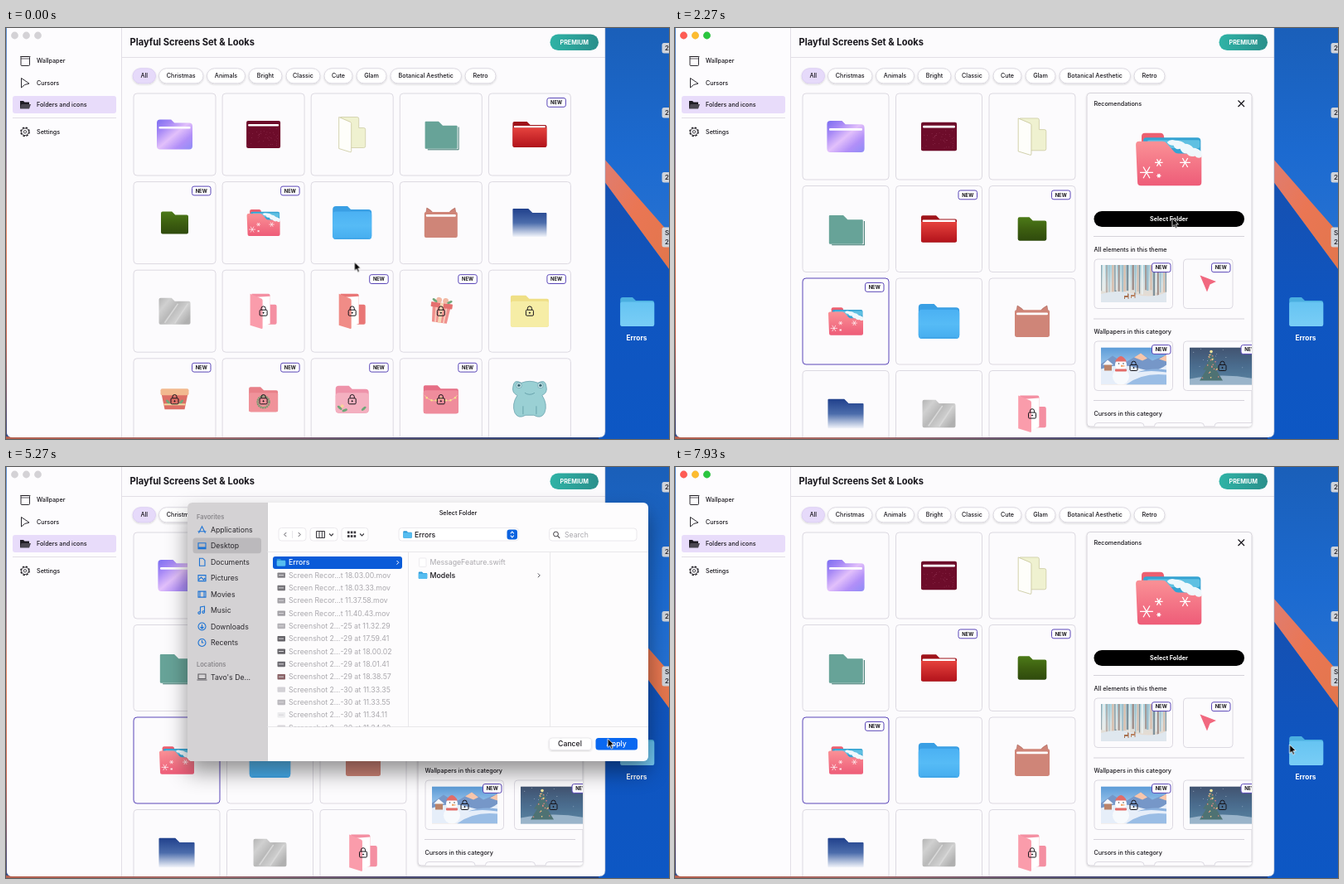
Animation, 800 px wide and 496 px high, one loop 8000 ms. Source, as an HTML page:

```html
<!DOCTYPE html>
<html lang="en">
<head>
<meta charset="utf-8">
<title>Folder themes</title>
<style>
html,body{margin:0;width:100%;height:100%;overflow:hidden;background:#1059c4}
svg{display:block;width:100vw;height:100vh}
text{font-family:Inter,"Open Sans",sans-serif;font-weight:500;fill:#17151b;white-space:pre}
#dialog{transform-origin:497px 199px}
</style>
</head>
<body>
<svg id="stage" viewBox="0 0 800 496" xmlns="http://www.w3.org/2000/svg"></svg>
<script>
const LOOP = 8000;
const BORDER = '#dcd9e1', INK = '#17151b', VIOLET = '#5a46b8';

let seed = 7;
const rnd = () => (seed = seed * 16807 % 2147483647) / 2147483647;
const times = (n, fn) => Array.from({length: n}, (_, i) => fn(i)).join('');

const rect = (x, y, w, h, fill, r = 0, more = '') =>
  `<rect x="${x}" y="${y}" width="${w}" height="${h}" rx="${r}" fill="${fill}" ${more}/>`;
const circle = (x, y, r, fill, more = '') => `<circle cx="${x}" cy="${y}" r="${r}" fill="${fill}" ${more}/>`;
const path = (d, fill, more = '') => `<path d="${d}" fill="${fill}" ${more}/>`;
const line = (d, color = INK, w = 1, more = '') => path(d, 'none', `stroke="${color}" stroke-width="${w}" ${more}`);
const text = (x, y, s, size = 7.2, more = '') => `<text x="${x}" y="${y}" font-size="${size}" ${more}>${s}</text>`;
const mid = (x, y, s, size, more = '') => text(x, y, s, size, 'text-anchor="middle" ' + more);
const group = (s, more = '') => `<g ${more}>${s}</g>`;
const at = (x, y, s, k = 1) => group(s, `transform="translate(${x} ${y}) scale(${k})"`);
const bold = 'style="font-weight:700"';
const white = 'style="font-weight:700;fill:#fff"';
const gray = 'style="font-weight:400;fill:#aaa8ad"';

const gradient = (id, stops, x2 = 0, y2 = 1) =>
  `<linearGradient id="${id}" x2="${x2}" y2="${y2}">` +
  stops.map((c, i) => `<stop offset="${i / (stops.length - 1)}" stop-color="${c}"/>`).join('') + '</linearGradient>';
const clip = (id, shape) => `<clipPath id="${id}">${shape}</clipPath>`;

const defs = `<defs>
${gradient('sky', ['#1a5fb9', '#1c6ad0', '#2a74d2'])}
${gradient('deepSky', ['#1650b0', '#0f55c0', '#0d57c4'])}
${gradient('band', ['#dc7f78', '#ea7654', '#e2764c'], 1, 1)}
${gradient('edge', ['#5f8fd0', '#8b93c4', '#e58a68', '#c96a55', '#384a80'])}
${gradient('floor', ['#b5614f', '#a46a6a', '#4a4a74', '#22407e'], 1, 0)}
${gradient('teal', ['#2fb3a6', '#2a8f8b'], 1, 0)}
${gradient('purple', ['#7b6df0', '#a88af6', '#e2c0fb', '#b18ff8', '#8f8cf6'], 1, 1)}
${gradient('red', ['#e5423d', '#b3131b'])}
${gradient('green', ['#4c7a18', '#3d5f10', '#2f4a0d'])}
${gradient('pink', ['#fa9196', '#ee5c78'])}
${gradient('azure', ['#4bb1f3', '#56bbf6', '#45adef'])}
${gradient('navy', ['#20408c', '#4b6cab', '#f3f5fb'])}
${gradient('silver', ['#b4b4b4', '#d0d0d0', '#b9b9b9', '#cfcfcf', '#b0b0b0'], 1, .7)}
${gradient('folderBlue', ['#66c4f2', '#79cdf6'])}
${gradient('forest', ['#a9d3df', '#d4e0e2', '#f0d9c8'])}
${gradient('dawn', ['#2f7fcc', '#7fb6e6', '#f6c9a6'])}
${gradient('night', ['#0c2348', '#17436e', '#2c6288'])}
${clip('window', path('M0 0H723V487q0 7-7 7H8q-7 0-7-7V0z', '#000'))}
${clip('panelBox', rect(497, 79, 199, 402, '#000', 4))}
${clip('list', rect(315, 103, 460, 210.5, '#000'))}
${clip('picture', rect(0, 0, 79, 45, '#000'))}
<filter id="soft" x="-10%" y="-10%" width="120%" height="125%"><feDropShadow dx="0" dy="1" stdDeviation="1" flood-opacity=".16"/></filter>
<filter id="deep" x="-15%" y="-15%" width="130%" height="145%"><feDropShadow dx="0" dy="13" stdDeviation="13" flood-opacity=".42"/></filter>
</defs>`;

// Folder icons, centred on 0,0
const folder = (w, h, fill, tab = .42, slope = 4, r = 2) => {
  const x = -w / 2, y = -h / 2;
  return path(`M${x} ${y + r}q0 ${-r} ${r} ${-r}h${w * tab - r}l${slope} ${slope}H${-x - r}q${r} 0 ${r} ${r}V${-y - r}q0 ${r} ${-r} ${r}H${x + r}q${-r} 0 ${-r} ${-r}z`, fill);
};
const strip = (w, y) => rect(-w / 2, y, w, 2.6, '#fff', 1);
const open = (back, front, stroke) =>
  path('M-14-21H6q2 0 2 2V-8h6q2 0 2 2V14q0 2-2 2H-14z', back, stroke ? `stroke="${stroke}" stroke-width=".7"` : '') +
  (stroke ? '' : path('M-8-17L8-18V15L-2 19z', '#fff')) +
  path('M-16-21L-2-15q1 1 1 2V20q0 2-2 1L-16 17z', front, `stroke="${stroke || 'none'}" stroke-width=".8"`);
const flake = (x, y, r) => line(times(3, i => {
  const a = i * Math.PI / 3, c = r * Math.cos(a), s = r * Math.sin(a);
  return `M${x - c} ${y - s}L${x + c} ${y + s}`;
}), '#fff', .65);
const snow =
  path('M-16.500-14q0-2 2-2H-5q1.500 0 2 1.500L-2-8H-16.500z', '#ec5f70') +
  rect(-15.5, -13.3, 35, 20, '#35a3d2', 2) + rect(-13, -11.8, 32, 5, '#5fc0e2', 1) +
  path('M-20-9q0-2 2-2H-4q2 0 3 1.500L3-5q1 1.500 3 1.500h12q2 0 2 2V14q0 2-2 2H-17q-2 0-2-2z', 'url(#pink)') +
  path('M-1-10.500q2-2 5-1q4 0 6 2q3 0 5 2.500q3 0 5 2.500v3q-2 1.500-4-.5q-3 1-5-1.500q-3 0-4-3q-3 1-4-2q-3 0-4-2z', '#eff8fc') +
  flake(-13.5, 8, 4) + flake(-6, 2, 2.4) + flake(10, 2, 3.2) + flake(-6, 10, 1.3);
const leaf = (x, y, a = 0) => `<ellipse cx="${x}" cy="${y}" rx="3.4" ry="1.500" fill="#6fa678" transform="rotate(${a} ${x} ${y})"/>`;

const icons = [
  folder(43, 36, 'url(#purple)', .4, 4, 4) + strip(38, -9.5),
  rect(-20.5, -16.5, 41, 33, '#6d0c2a', 2) + strip(37, -12.5) +
    times(42, () => circle(-19 + rnd() * 38, -8 + rnd() * 23, .35, '#b05474')),
  open('#eff1d0', '#fefefa', '#c9c79c'),
  line('M-16 18.300H21.300V-9', '#3b766d', 1) + at(.3, .8, folder(39, 33, '#67a398', .42, 5, 1)),
  folder(41, 31, '#9f131a') + strip(38, -10.5) + path('M-20.500-8h41V13q0 2-2 2h-37q-2 0-2-2z', 'url(#red)'),
  folder(33, 27, 'url(#green)', .4),
  snow,
  folder(47, 40, '#3a9fe4', .38, 4, 4) + rect(-23.5, -13.5, 47, 33.5, 'url(#azure)', 4) + line('M-20 18.800H20', '#3d9fe0', .8),
  path('M-18-12L-17-18Q-11-15-9-11zM18-12L17-18Q11-15 9-11z', '#cf8578', 'stroke="#a8645a" stroke-width=".6"') +
    rect(-20, -13, 40, 31, '#cf8578', 2) + strip(36, -10),
  folder(41, 34, 'url(#navy)', .46, 5, 1),
  folder(38, 32, 'url(#silver)', .4) + line('M-12 14L4-9M0 15L16-9', '#d8d8d8', 1.5),
  open('#f48fa2', '#fa9cab'),
  open('#e97676', '#f08c87'),
  group(path('M-11-6H11L9 14H-9z', '#ef8f8c') + line('M-6-5L-5 14M6-5L5 14', '#f8c9bd', 2) + rect(-13, -10, 26, 6, '#e4706f', 1) +
    rect(-2, -10, 4, 24, '#f6d6b5') + circle(-4, -13, 3.4, '#f2b8a4') + circle(4, -13, 3.4, '#f2b8a4') +
    leaf(-9, -12, 30) + leaf(9, -12, -30), 'transform="rotate(8)"'),
  folder(46, 38, '#efdf86', .4) + rect(-23, -12, 46, 31, '#f6eda6', 3),
  path('M-16-7H16L12 12H-12z', '#dd6f66') + rect(-17, -13, 34, 8, '#f2b98f', 2) + leaf(-8, 3, 50) + leaf(8, 3, -50) + line('M-13 6H13', '#f3d7a0', 2),
  folder(35, 30, '#e88089', .4) + rect(-17.5, -8, 35, 23, '#f0929a', 2) + circle(0, 3, 7, 'none', 'stroke="#7d9a72" stroke-width="2.500" stroke-dasharray="2 .6"'),
  folder(40, 33, '#ee93aa', .4, 4, 4) + rect(-20, -8, 40, 24, '#f4b0c0', 4) + leaf(-15, 10, 40) + leaf(-9, 13, -20) + leaf(14, 11, -40) + circle(-12, 8, 2, '#f6d49a'),
  folder(42, 34, '#e66f86', .4) + rect(-21, -11, 42, 28, '#ef8c9c', 3) + line('M-20-5Q-10 6 0-1Q10 6 20-5', '#f7d7a0', .8) +
    times(7, i => circle(-17 + i * 5.7, i % 3 ? 1 : -2, 1.2, '#f9e08c')),
  group(path('M-10-20q-9-5-10 4Q-22-8-15-5Q-22 6-18 16Q-14 24-5 19H5Q14 24 18 16Q22 6 15-5Q22-8 20-16Q19-25 10-20Q0-24-10-20z', '#9ad0d4') +
    circle(-13, -17, 3.4, '#d8eff0') + circle(13, -17, 3.4, '#d8eff0') + circle(-13, -17, 1.6, '#355a66') + circle(13, -17, 1.6, '#355a66') +
    line('M-6-8Q0-4 6-8M-8 18V8M8 18V8', '#5c98a2', .8), 'stroke="#5f9aa6" stroke-width=".7"')
];
const isNew = i => [4, 5, 6].includes(i) || i > 11 && i < 19;
const lock = group(rect(-4.5, -1.5, 9, 7, 'none', 1.2) + path('M-2.600-1.500V-3.200a2.600 2.600 0 0 1 5.200 0V-1.500', 'none') +
  circle(0, 2, .6, INK), `stroke="${INK}" stroke-width="1"`);
const badge = (x, y) => rect(x, y, 22.5, 10.8, '#fff', 2.4, `stroke="${VIOLET}" stroke-width="1"`) + mid(x + 11.2, y + 7.5, 'NEW', 5.8, bold);

function grid(cols, count, size, dx, dy, selected) {
  return times(count, i => {
    const x = 154 + i % cols * dx, y = 79 + Math.floor(i / cols) * dy, c = size / 2;
    return rect(x, y, size, size, '#fcfbfd', 4, `stroke="${i === selected ? VIOLET : BORDER}"`) +
      at(x + c, y + c, icons[i], size / 99) +
      (i > 10 && i < 19 ? at(x + c, y + c, lock) : '') +
      (isNew(i) ? badge(x + size - 28.5, y + 5.5) : '');
  });
}

// Sidebar, header and category chips
const chips = [['All', 153, 180.5], ['Christmas', 184.5, 238], ['Animals', 242.5, 288.5], ['Bright', 293, 333], ['Classic', 338, 379],
  ['Cute', 384, 418], ['Glam', 423, 459], ['Botanical Aesthetic', 464, 549.5], ['Retro', 554, 591]];
const lights = colors => colors.map((c, i) => circle(10.5 + 14 * i, 9, 4.4, c)).join('');

const frame = rect(0, 0, 723, 494, '#fcfbfd') + rect(0, 0, 139, 494, '#fdfcfe') +
  line('M139.500 0V494', '#e2dfe6') + line('M140 35.500H723', '#e2dfe6') +
  rect(8, 82, 125, 21, '#e8dcfa', 3) + line('M8 108.500H133', '#e2dfe6') +
  rect(18, 34.5, 10.5, 11, 'none', 1, `stroke="${INK}" stroke-width=".9"`) + line('M17 34.500H29.500M18 37H28.500', INK, .7) +
  line('M18.500 60.500L28 67L22.500 68.500L18.500 72z', INK, .9, 'stroke-linejoin="round"') +
  path('M17 88h4l1.500 1.500H28V97H17z', '#201d25') + path('M18.500 92H30L28 97.500H17z', '#4a4650') +
  circle(23, 125.3, 5.2, 'none', `stroke="${INK}" stroke-width="1.300" stroke-dasharray="2.400 1.700"`) +
  circle(23, 125.3, 4.3, '#fdfcfe', `stroke="${INK}" stroke-width=".8"`) + circle(23, 125.3, 1.7, 'none', `stroke="${INK}" stroke-width=".8"`) +
  text(37, 42.3, 'Wallpaper') + text(37, 68.7, 'Cursors') + text(37, 95.2, 'Folders and icons') + text(37, 128, 'Settings') +
  text(149.5, 21, 'Playful Screens Set &amp; Looks', 11.1, bold) +
  rect(656.5, 7.5, 58.5, 19.5, 'url(#teal)', 9.7) + mid(685.7, 19.9, 'PREMIUM', 7.2, white) +
  chips.map(([s, a, b], i) => rect(a, 48.8, b - a, 18, i ? '#fff' : '#e6dafa', 9, `stroke="${i ? BORDER : '#dccff2'}" filter="url(#soft)"`) +
    mid((a + b) / 2, 60.3, s)).join('');

// Small wallpaper pictures, 79 by 45
const forest = rect(0, 0, 79, 45, 'url(#forest)') +
  times(26, i => rect(i * 3.1 - 1 + rnd() * 2, 0, .8 + rnd() * 1.8, 30 + rnd() * 8, ['#7f929c', '#e8eeee', '#a08f8b', '#9bbcca', '#d9bfae'][i % 5])) +
  path('M0 35Q20 29 40 35T79 33V45H0z', '#dfe7ee') + path('M28 37h4v-3l1.500 1v6h-1v-2h-3.500v2h-1z', '#a9714f') +
  path('M36 36h4v-3l1.500 1v6h-1v-2h-3.500v2h-1z', '#b98362');
const snowman = rect(0, 0, 79, 45, 'url(#dawn)') +
  path('M0 20L14 10L28 19L48 7L62 16L79 9V30H0z', '#4f7ab8') + path('M40 12L48 7L56 13L50 16zM70 14L79 9V17z', '#f3b695') +
  path('M0 26Q24 18 45 25T79 21V45H0z', '#dfe9f7') + path('M30 45Q50 30 79 33V45z', '#7eaade') + path('M44 30Q60 24 79 27V30Q60 27 44 30z', '#6c9cd6') +
  rect(4, 20, 9, 8, '#a7603f') + path('M2 21L8 15L15 21z', '#f2f5fa') +
  circle(24, 35, 10, '#f5f8fc') + circle(24, 21, 7, '#fbfcff') + path('M17 17Q24 4 31 17z', '#d9423d') +
  rect(17, 26, 14, 3, '#d9423d', 1) + path('M24 21l6 1.500l-6 1z', '#ec8738') + circle(21.5, 19.5, .8, INK) + circle(27, 19.5, .8, INK);
const tree = rect(0, 0, 79, 45, 'url(#night)') + path('M0 38Q40 30 79 38V45H0z', '#7d9fbb') +
  path('M26 5L31 15H28L36 27H32L40 40H12L20 27H16L24 15H21z', '#1c4a4c') +
  times(22, () => { const y = 8 + rnd() * 30; return circle(26 + (rnd() - .5) * y * .6, y, .8, rnd() < .5 ? '#f6c763' : '#e0665e'); }) +
  circle(26, 5, 1.8, '#f9df80') + times(12, () => circle(rnd() * 79, rnd() * 25, .4, '#dfeefa'));

const card = (x, y, w) => rect(x, y, w, 59.5, '#fcfbfd', 4, `stroke="${BORDER}"`);
const picture = (x, y, s, locked) => at(x, y, group(s + (locked ? rect(0, 0, 79, 45, '#fff', 0, 'opacity=".22"') : ''), 'clip-path="url(#picture)"')) +
  (locked ? at(x + 39.5, y + 22.5, lock) : '');
const rule = y => line(`M505 ${y}H687`, '#d5d2da');

const panel = rect(497, 78.5, 199, 402.5, '#fcfbfd', 4, 'stroke="#d6d3da" filter="url(#soft)"') + group(
  text(505.5, 94, 'Recomendations') + line('M679.500 87.500L687 95M687 87.500L679.500 95', INK, 1.2) +
  at(595.7, 158.5, snow, 1.98) +
  rect(505.5, 221, 181.5, 19, '#000', 9.5) + mid(596, 233, 'Select Folder', 7.2, white) + rule(251.5) +
  text(505.5, 270.3, 'All elements in this theme') +
  card(506, 279, 94.5) + picture(514, 286, forest) + badge(575.5, 283.8) +
  card(613.5, 279, 59.5) + path('M633.500 298.500L653 306L645.500 309.500L642 318.500z', '#f1687f') + badge(647.5, 283.8) + rule(351) +
  text(505.5, 369, 'Wallpapers in this category') +
  card(506, 378, 94.5) + picture(514, 385.5, snowman, true) + badge(575.5, 382.6) +
  card(613.5, 378, 94.5) + picture(621, 385.5, tree, true) + badge(683, 382.6) + rule(449.5) +
  text(505.5, 468, 'Cursors in this category') + times(3, i => card(506 + i * 72.5, 476.5, 60)), 'clip-path="url(#panelBox)"') +
  group(rect(491, 80.5, 4.6, 53, '#7c7b7e', 2.3) + rect(689, 109, 4.6, 252, '#7c7b7e', 2.3) + rect(499, 443, 35, 4.6, '#7c7b7e', 2.3), 'id="scrollbars"');

// Folder chooser
const smallFolder = (x, y) => at(x, y, folder(10.5, 8.5, '#2f9ad8', .4, 1.5, 1) + rect(-5.2, -2.3, 10.4, 6.5, '#56bdf0', 1));
const chevron = (x, y, dir = 1) => line(`M${x - 1.2 * dir} ${y - 2.4}l${2.4 * dir} 2.400l${-2.4 * dir} 2.400`, '#55535a', 1);
const down = (x, y) => line(`M${x - 2.4} ${y - 1.2}l2.400 2.400l2.400-2.400`, '#3a383e', 1.1);
const upDown = (x, y, c) => line(`M${x - 2} ${y - 1.2}l2-2.300l2 2.300M${x - 2} ${y + 1.2}l2 2.300l2-2.300`, c, 1.1);
const tool = (x, w) => rect(x, 73.5, w, 15.5, '#fff', 3.5, 'stroke="#ebe9ed"');

const glyphs = ['M-4 4L0-4L4 4M-5 2H5', 'M-4.500-3.500h9v7h-9zM-4.500 1.800h9M-4.500 2.600h9', 'M-3-4.500H1L3.500-2V4.500H-3z', 'M-4.500-3.500h9v7h-9zM-4 2L-1-1L2 2L3 .500L4.500 2',
  'M-4.500-3.500h9v7h-9zM-2.500-3.500v7M2.500-3.500v7', 'M-2 3V-4L3-5V2M-2 3a1.300 1.300 0 1 1-.1-.5M3 2a1.300 1.300 0 1 1-.1-.5',
  'M-4.500 0a4.500 4.500 0 1 0 9 0a4.500 4.500 0 1 0-9 0M0-2.500V2.500M-2 .500L0 2.500L2 .500', 'M-4.500 0a4.500 4.500 0 1 0 9 0a4.500 4.500 0 1 0-9 0M0-3V0H2'];
const places = ['Applications', 'Desktop', 'Documents', 'Pictures', 'Movies', 'Music', 'Downloads', 'Recents'];
const clips = ['18.03.00', '18.03.33', '11.37.58', '11.40.43'].map(s => `Screen Recor...t ${s}.mov`);
const shots = ['25 at 11.32.29', '29 at 17.59.41', '29 at 18.00.02', '29 at 18.01.41', '29 at 18.38.57', '30 at 11.33.35', '30 at 11.33.55', '30 at 11.34.11', '30 at 11.34.30']
  .map(s => `Screenshot 2...-${s}`);
const rowY = i => 115.3 + i * 15.33;
const thumbs = ['#858388', '#77757a', '#a3a1a6', '#a3a1a6', '#b4b2b7', '#67656a', '#67656a', '#6e6c72', '#8b6468', '#d3d1d6', '#bbb9be', '#ececee', '#d8d6da'];
const label = 'style="font-weight:600;fill:#8a888c"';

const sheet = rect(219, 43, 556, 312, '#fdfcfd', 6, 'filter="url(#deep)"') +
  path('M225 43H315V355H225q-6 0-6-6V49q0-6 6-6z', '#d4d2d4') + line('M315.500 43V355', '#c5c3c6', .8) +
  text(230, 62.8, 'Favorites', 7.5, label) + rect(225.5, 85.5, 82.5, 18.8, '#bbb9bc', 3.5) +
  places.map((s, i) => text(247, 78.8 + i * 19.45, s, 8.7, 'style="fill:#29272c;font-weight:400"') + at(236.5, 75.8 + i * 19.45, line(glyphs[i], '#1c73d4', 1.1))).join('') +
  text(230, 241, 'Locations', 7.5, label) + text(247, 257, "Tavo's De...", 8.7, 'style="fill:#29272c;font-weight:400"') +
  line('M232 250h9v5.500h-9zM230.500 257h12', '#5d5b60', 1.1) +
  mid(545.5, 57.8, 'Select Folder', 7.3) +
  tool(329, 33) + chevron(337, 81.5, -1) + chevron(354, 81.5) + line('M345.500 77V86', '#dddbe0', .7) +
  tool(367, 33) + line('M374.500 77.500h10v8h-10zM378 77.500v8M381.300 77.500v8', '#3a383e', 1) + down(392.5, 81.7) +
  tool(405, 32) + times(6, i => rect(412 + i % 3 * 3.8, 77.5 + (i > 2 ? 4.6 : 0), 2.6, 2.8, '#3a383e')) + down(429.5, 81.7) +
  rect(474, 73.5, 144.5, 15.5, '#fff', 3.5, 'stroke="#ebe9ed"') + smallFolder(484.5, 81.5) +
  rect(655.5, 74, 105.5, 15, '#fff', 3.5, 'stroke="#eae8ec"') + circle(663.5, 81, 2.9, 'none', 'stroke="#444247"') + line('M665.600 83.200l2.600 2.600', '#444247', 1.1) +
  text(674, 84.8, 'Search', 8.7, gray) +
  line('M315 102.500H775M315 313.500H775', '#e4e2e6', .8) + line('M485.500 103V313', '#e4e2e6', .8) +
  group([...clips, ...shots].map((s, i) => text(341, rowY(i + 1) + 3.1, s, 8.75, gray) +
    rect(327.5, rowY(i + 1) - 3.2, 9.5, 6.4, thumbs[i], .8) + rect(329, rowY(i + 1) - .6, 6, 1, '#d6d4d8')).join(''), 'clip-path="url(#list)"') +
  rect(655.5, 327, 51, 14.5, '#fff', 3.5, 'stroke="#e3e1e5" stroke-width=".7" filter="url(#soft)"') + mid(680.5, 337.2, 'Cancel', 8.7) +
  group(text(493, 84.8, 'Desktop', 8.7) + upDown(610.5, 81.5, '#3a383e') + text(341, 118.4, 'Errors', 8.75) + smallFolder(332, 115.3) +
    chevron(472.5, 115.3) + mid(737, 337.2, 'Apply', 8.7, 'style="fill:#aaa8ad"'), 'id="idle"') +
  group(text(493, 84.8, 'Errors', 8.7) + rect(604.5, 75.5, 12.5, 12, '#0b63e0', 3) + upDown(610.8, 81.5, '#fff') +
    rect(322, 108, 156, 15, '#0a5bd8', 3) + smallFolder(332, 115.3) + text(341, 118.4, 'Errors', 8.75, 'style="fill:#fff"') +
    line('M471.500 113l2.300 2.300l-2.300 2.300', '#fff') + line('M656.500 103V313', '#e4e2e6', .8) +
    rect(498.5, 110, 8.5, 10.5, '#fff', 1, 'stroke="#e6e4e8" stroke-width=".7"') + text(511.5, 118.4, 'MessageFeature.swift', 8.75, gray) +
    smallFolder(503, 130.8) + text(511.5, 133.8, 'Models', 8.75) + chevron(643, 130.8) +
    rect(711.5, 327, 50.5, 14.5, '#0a68f0', 3.5) + mid(736.7, 337.2, 'Apply', 8.7, 'style="fill:#fff"'), 'id="picked"');

const tag = (y, h, lines) => rect(791.5, y, 14, h, '#cfd3da', 2.5) + lines.map((s, i) => text(795, y + 9 + i * 11, s, 8)).join('');
const desktop = rect(700, 0, 100, 300, 'url(#sky)') + rect(0, 0, 2, 496, 'url(#edge)') + rect(0, 493, 724, 3, 'url(#floor)') +
  path('M715 150L800 247V291L715 176z', 'url(#band)') + path('M715 176L800 291V496H715z', 'url(#deepSky)') +
  tag(18, 12.5, ['2']) + tag(96, 12.5, ['2']) + tag(174, 12.5, ['2']) + tag(240.5, 24, ['S', '2']) +
  at(761.7, 342.5, folder(41, 35, '#4bafe0', .36, 4, 3) + rect(-20.5, -12, 41, 29.5, 'url(#folderBlue)', 2.5)) +
  mid(761, 377.4, 'Errors', 8.4, white);

const pointer = path('M0 0V10.500L2.500 8.300L4.200 12.200L6 11.400L4.300 7.600H7.600z', '#000', 'stroke="#fff" stroke-width=".8" stroke-linejoin="round"');

document.getElementById('stage').innerHTML = defs + desktop +
  group(frame + lights(Array(3).fill('#d4d2d6')) + group(lights(['#ff5c54', '#fdbc2f', '#2ac63f']), 'id="active"') +
    group(grid(5, 20, 99, 107.1, 106.6), 'id="wide"') +
    group(grid(3, 12, 104, 112.5, 111.5, 6) + panel, 'id="narrow"'), 'clip-path="url(#window)"') +
  line('M723 0V487q0 7-7 7', '#8fa3c4', .6) +
  group(rect(219, 43, 556, 312, '#b9b7b8', 7, 'filter="url(#deep)"'), 'id="veil"') +
  group(sheet, 'id="dialog"') + group(pointer, 'id="pointer"');

// Timeline: each step is [ms, value]
const play = (id, steps, easing, frameOf) => document.getElementById(id).animate(
  [...steps, [LOOP, ...steps.at(-1).slice(1)]].map(([ms, ...v]) => ({offset: ms / LOOP, easing, ...frameOf(...v)})),
  {duration: LOOP, iterations: Infinity});
const opacity = v => ({opacity: v});
const toggle = (id, steps) => play(id, steps, 'step-end', opacity);
const fade = (id, steps) => play(id, steps, 'linear', opacity);

toggle('wide', [[0, 1], [930, 0]]);
toggle('narrow', [[0, 0], [930, 1]]);
toggle('active', [[0, 0], [800, 1], [2930, 0], [5730, 1]]);
toggle('idle', [[0, 1], [4330, 0]]);
toggle('picked', [[0, 0], [4330, 1]]);
fade('scrollbars', [[0, 1], [1600, 1], [1850, 0]]);
fade('veil', [[0, 0], [5700, 0], [5760, .7], [5870, .47], [6070, 0]]);
play('dialog', [[0, 0, .76], [3000, 0, .76], [3130, .77, .818], [3270, 1, 1], [5700, 1, 1], [5830, 0, 1]], 'linear',
  (o, k) => ({opacity: o, transform: `scale(${k})`}));
play('pointer', [[0, 420.5, 282.5], [350, 420.5, 282.5], [850, 315.8, 235], [1600, 315.8, 235], [2400, 615.6, 229], [3250, 615.6, 229],
  [4100, 368.3, 121.3], [4700, 368.3, 121.3], [5350, 737, 334], [5600, 737, 334], [5830, 756.2, 336.3], [7070, 755.2, 336.3], [7500, 755.2, 336.3], [7930, 741.6, 335]],
  'ease-in-out', (x, y) => ({transform: `translate(${x}px,${y}px)`}));
</script>
</body>
</html>
```
